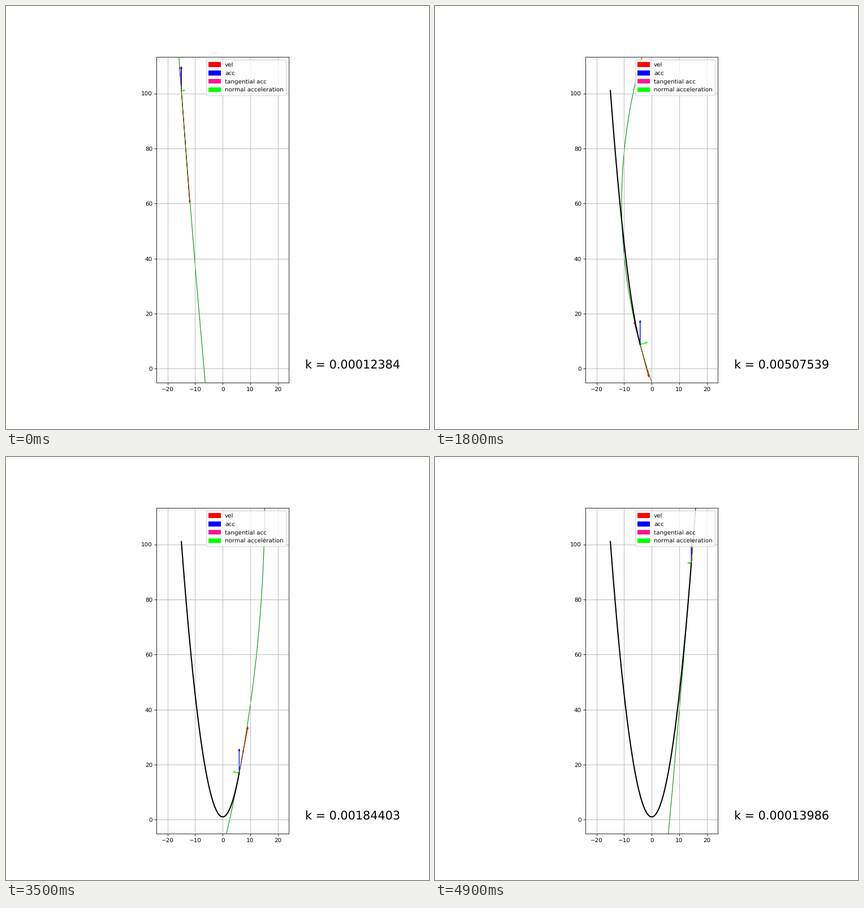
Write a matplotlib script that moves like this. It is 748x748 px and loops after 5000 ms.

```python
import numpy as np
import matplotlib.pyplot as plt
from matplotlib.animation import FuncAnimation

plt.rcParams.update({"font.family": "DejaVu Sans", "text.hinting": "no_hinting"})

FRAMES, INTERVAL = 50, 100
TIMES = -5 + 0.2 * np.arange(FRAMES)
ACC = np.array([0.0, 8.0])


def position(t):
    return np.array([3 * t, 4 * t**2 + 1])


def velocity(t):
    return np.array([3.0, 8 * t])


fig, ax = plt.subplots(figsize=(10, 10), dpi=74.8)
fig.subplots_adjust(left=0.1245)
ax.set_aspect("equal")
ax.set_xlim(-24, 24)
ax.set_ylim(-5, 113.3)
ax.grid()


def make_arrow(color, label):
    return ax.arrow(0, 0, 0, 1, head_width=0.5, color=color, label=label)


arrows = [
    make_arrow("red", "vel"),
    make_arrow("blue", "acc"),
    make_arrow("deeppink", "tangential acc"),
    make_arrow("lime", "normal acceleration"),
]
circle = ax.add_patch(plt.Circle((0, 0), 1, color="green", fill=False))
trail, = ax.plot([], [], color="black", lw=2)
label = ax.text(30, 0, "", fontsize=20)
ax.legend(loc="upper right")


def update(frame):
    t = TIMES[frame]
    p, v = position(t), velocity(t)
    tangential = ACC @ v / (v @ v) * v
    normal = ACC - tangential
    for arrow, (dx, dy) in zip(arrows, (v, ACC, tangential, normal)):
        arrow.set_data(x=p[0], y=p[1], dx=dx, dy=dy)

    curvature = np.linalg.norm(ACC) / (1 + v @ v) ** 1.5
    radius = 1 / curvature
    circle.set_center(p + radius * normal / np.linalg.norm(normal))
    circle.set_radius(radius)

    trail.set_data(*position(TIMES[:frame + 1]))
    label.set_text(f"k = {curvature:.8f}")
    return [*arrows, circle, trail, label]


anim = FuncAnimation(fig, update, frames=FRAMES, interval=INTERVAL,
                     init_func=lambda: update(0), repeat=True, repeat_delay=0)
plt.show()
```
